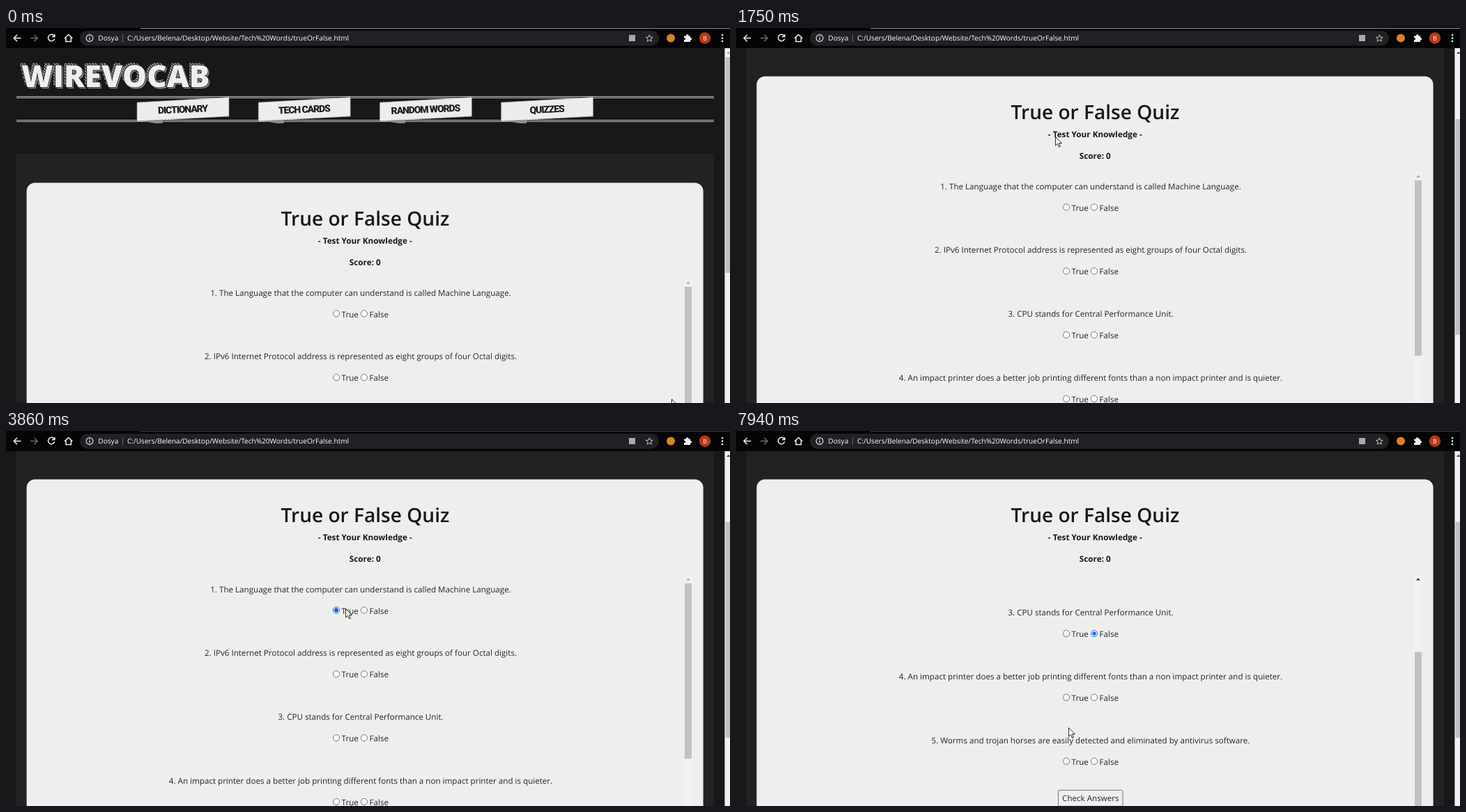
An HTML page for the animation above (8 s loop, 1039x539 px).

```html
<!DOCTYPE html>
<html lang="en">
<head>
<meta charset="utf-8">
<title>True or False Quiz</title>
<style>
  html, body { margin: 0; width: 100%; height: 100%; overflow: hidden; background: #181818; }
  svg { display: block; }
  text { font-family: "Open Sans", "Noto Sans", sans-serif; text-rendering: geometricPrecision; white-space: pre; }
  .mid { text-anchor: middle; }
  .title { font-size: 28.1px; font-weight: 600; fill: #16181b; }
  .body { font-size: 11.62px; fill: #212529; }
  .bold { font-size: 11.75px; font-weight: 700; fill: #16181b; }
  .logo { font-size: 44px; font-weight: 800; }
  .tag { font: 900 14px Roboto, sans-serif; letter-spacing: -1.1px; fill: #1c1c1c; }
  .url { font-size: 10.1px; fill: #fff; }
  .icon { fill: none; stroke: #f1f1f1; stroke-width: 1.5; }
</style>
</head>
<body>
<script>
const LOOP = 8000, TICK = 66, NOTCH = 76.6, NOTCH_TIME = 200, ROW = 91.8;

// The pointer glides along one quadratic curve per entry and rests in between.
const home = [955, 533];
const glides = [
  { start: 60, end: 70, via: [800, 460], to: [646, 395] },
  { start: 145, end: 1000, via: [482, 47], to: [525, 165] },
  { start: 1530, end: 2010, via: [440, 150], to: [372, 152] },
  { start: 2015, end: 2860, via: [152, 350], to: [509, 290] },
  { start: 2865, end: 3440, via: [490, 262], to: [487, 255] },
  { start: 4155, end: 4890, via: [500, 391], to: [525, 349] },
  { start: 5340, end: 5900, via: [413, 379], to: [477, 438] },
  { start: 6365, end: 6920, via: [500, 441], to: [525, 442] },
  { start: 7395, end: 7600, via: [500, 430], to: [477, 426] }
];

// Wheel turns, two for the page and two for the question list.
const pageWheel = [1210, 1420], listWheel = [7420, 7780];

const options = [
  { id: "r0t", enter: 3300, leave: 4300, check: 3720 },
  { id: "r1f", enter: 4890, leave: 5340, check: 5080 },
  { id: "r2t", enter: 6240, leave: 6490, check: Infinity },
  { id: "r2f", enter: 6860, leave: 7530, check: 7080 }
];

const questions = [
  "1. The Language that the computer can understand is called Machine Language.",
  "2. IPv6 Internet Protocol address is represented as eight groups of four Octal digits.",
  "3. CPU stands for Central Performance Unit.",
  "4. An impact printer does a better job printing different fonts than a non impact printer and is quieter.",
  "5. Worms and trojan horses are easily detected and eliminated by antivirus software."
];

const rect = (x, y, w, h, fill, more = "") =>
  `<rect x="${x}" y="${y}" width="${w}" height="${h}" fill="${fill}" ${more}/>`;
const circle = (x, y, r, fill) => `<circle cx="${x}" cy="${y}" r="${r}" fill="${fill}"/>`;
const text = (x, y, cls, s, more = "") => `<text x="${x}" y="${y}" class="${cls}" ${more}>${s}</text>`;
const hatch = (id, width, fill) =>
  `<pattern id="${id}" width="3" height="3" patternUnits="userSpaceOnUse" patternTransform="rotate(-45)">
    ${rect(0, 0, width, 3, fill)}</pattern>`;

const doubleLine = y => [y, y + 2].map(v => rect(15, v, 1001, 1, "#bdbdbd")).join("");
const logo = (x, y, style) => text(x, y, "logo", "WIREVOCAB", style);

const tag = (label, i) => {
  const paper = "M0 107L132 99.500V127L0 134Z";
  return `<g transform="translate(${188 + i * 174.2} 0)">
    <path d="M2 133L38 131L36 137H27Z" fill="#8f8f8f"/>
    <path d="${paper}" fill="#f4f4f4" stroke="#777" stroke-width=".8"/>
    <path d="${paper}" fill="url(#lightHatch)"/>
    ${text(65.5, 121.8, "tag mid", label, 'transform="rotate(-2.500 66 117)"')}</g>`;
};

const option = (id, x, y, label) => `<g id="${id}" transform="translate(${x} ${y})">
  <circle r="4.600" fill="#fff" stroke="#767676"/><circle r="2.900" fill="none"/>
  ${text(7.6, 5, "body", label)}</g>`;

const question = (q, i) => {
  const y = 384.5 + i * ROW;
  return text(509, y, "body mid", q)
    + option(`r${i}t`, 474, y + 26, "True") + option(`r${i}f`, 514, y + 26, "False");
};

const star = (x, y) => Array.from({ length: 10 }, (_, i) => {
  const a = i * Math.PI / 5, r = i % 2 ? 2.3 : 5.2;
  return `${(x + r * Math.sin(a)).toFixed(1)},${(y - r * Math.cos(a)).toFixed(1)}`;
}).join(" ");

const toolbar = `
  ${rect(0, 0, 1039, 29, "#050505")}
  <rect id="edge" x="193" width="846" height="1"/>
  ${rect(106, 4, 831, 21.5, "#202124", 'rx="10.700"')}
  <g class="icon">
    <path d="M21.500 14.500H11.500M16 9.800L11.300 14.500L16 19.200"/>
    <path d="M35 14.500H45M40.500 9.800L45.200 14.500L40.500 19.200" stroke="#6c6c6c"/>
    <path d="M69 11.200A4.700 4.700 0 1 0 69.700 15.500M69.900 9V12.600H66"/>
    <path d="M84 14.800L89.700 9.500L95.400 14.800M86 13.500V19.500H93.400V13.500"/>
    <circle cx="120" cy="14.500" r="4.900" stroke-width="1.100"/>
    <path d="M120 13.800V17.300M120 11.500V12.700" stroke-width="1.200"/>
    <polygon points="${star(923.3, 15)}" stroke="#c8c8c8" stroke-width="1"/>
  </g>
  ${rect(167, 9, 1, 11, "#5f6368")}
  ${rect(894, 10, 9, 9, "#a8abae")}
  ${circle(954, 14.5, 6, "#d98324")}
  <path d="M973 11.500H976A1.800 1.800 0 1 1 979.500 11.500H982V14A1.700 1.700 0 1 1 982 17.300V20H973V17A1.600 1.600 0 1 0 973 14Z" fill="#f1f1f1"/>
  ${circle(1003, 14.5, 8.3, "#b63a12")}
  ${text(1003, 17.8, "mid", "B", 'font-size="9" fill="#fff"')}
  ${[10, 14.5, 19].map(y => circle(1028, y, 1.3, "#f1f1f1")).join("")}
  ${text(132.3, 18, "url", "Dosya")}
  ${text(174, 18, "url", "C:/Users/Belena/Desktop/Website/Tech%20Words/trueOrFalse.html")}`;

document.body.innerHTML = `<svg width="1039" height="539" viewBox="0 0 1039 539">
  <defs>
    ${hatch("hatch", 1.4, "#cfcfcf")}${hatch("lightHatch", 1, "#dedede")}
    <clipPath id="listClip">${rect(30, 360, 943, 900, "#000")}</clipPath>
  </defs>
  ${rect(0, 0, 1039, 539, "#181818")}
  <g id="page">
    ${logo(19, 82, 'fill="url(#hatch)"')}
    ${logo(24, 87, 'fill="#8a8a8a"')}
    ${logo(22, 85, 'fill="#eee" stroke="#181818" stroke-width="1.500" paint-order="stroke"')}
    ${doubleLine(98)}${doubleLine(132)}
    ${["DICTIONARY", "TECH CARDS", "RANDOM WORDS", "QUIZZES"].map(tag).join("")}
    ${rect(15, 181, 1001, 900, "#222")}
    ${rect(29.6, 222.6, 971, 800, "#eee", 'rx="12"')}
    ${text(515.5, 284, "title mid", "True or False Quiz")}
    ${text(515.3, 310, "bold mid", "- Test Your Knowledge -")}
    ${text(515.3, 340.5, "bold mid", "Score: 0")}
    <g clip-path="url(#listClip)"><g id="list">
      ${questions.map(question).join("")}
      ${rect(462.5, 819.3, 92.5, 23, "#efefef", 'stroke="#767676" rx="1.500"')}
      ${text(508.8, 834.8, "body mid", "Check Answers")}
    </g></g>
    ${rect(973, 360, 12, 500, "#f1f1f1")}
    <path id="listArrow" d="M976 367.500L979 364.500L982 367.500Z"/>
    <rect id="listThumb" x="974" width="10" height="252" fill="#c1c1c1"/>
  </g>
  ${rect(1031.4, 29, 8, 510, "#f1f1f1")}
  <path id="pageArrow" d="M1034 37L1036.800 34L1039.600 37Z"/>
  <rect id="pageThumb" x="1032.500" width="7" height="310" fill="#c1c1c1"/>
  ${toolbar}
  <path id="pointer" d="M.5 .5V13L3.500 10.300L5.600 15L7.500 14.200L5.500 9.600H9.400Z" fill="#fff" stroke="#111" stroke-width=".9"/>
</svg>`;

const $ = id => document.getElementById(id);
const set = (id, name, value) => $(id).setAttribute(name, value);
const move = (id, x, y) => set(id, "transform", `translate(${Math.round(x)} ${Math.round(y)})`);

function progress(t, start, end) {
  if (t >= end) return 1;
  return Math.max(0, Math.floor((t - start) / TICK) * TICK / (end - start));
}

function pointerAt(t) {
  let from = home;
  for (const { start, end, via, to } of glides) {
    const u = progress(t, start, end), v = 1 - u;
    if (u < 1) return from.map((p, k) => v * v * p + 2 * u * v * via[k] + u * u * to[k]);
    from = to;
  }
  return from;
}

const easeOut = u => 1 - (1 - u) ** 2;
const scrolled = (turns, t) =>
  turns.reduce((sum, s) => sum + NOTCH * easeOut(Math.min(1, Math.max(0, (t - s) / NOTCH_TIME))), 0);

function drawOption({ id, enter, leave, check }, t) {
  const [ring, dot] = $(id).children;
  const hot = t >= enter && t < leave, on = t >= check;
  const color = on ? (hot ? "#0f5cbb" : "#1a73e8") : (hot ? "#4f4f4f" : "#767676");
  ring.setAttribute("stroke", color);
  dot.setAttribute("fill", on ? color : "none");
}

function render(t) {
  const page = scrolled(pageWheel, t), list = scrolled(listWheel, t);
  move("pointer", ...pointerAt(t));
  move("page", 0, -page);
  move("list", 0, -list);
  set("pageThumb", "y", 42 + page * 0.58);
  set("listThumb", "y", 372 + list * 0.656);
  set("pageArrow", "fill", page ? "#404040" : "#a3a3a3");
  set("listArrow", "fill", list ? "#3a1c22" : "#a3a3a3");
  set("edge", "fill", t < 3720 ? "#8b8b8b" : "#3a3a3a");
  options.forEach(o => drawOption(o, t));
}

function frame() {
  render(performance.now() % LOOP);
  requestAnimationFrame(frame);
}
frame();
</script>
</body>
</html>
```
